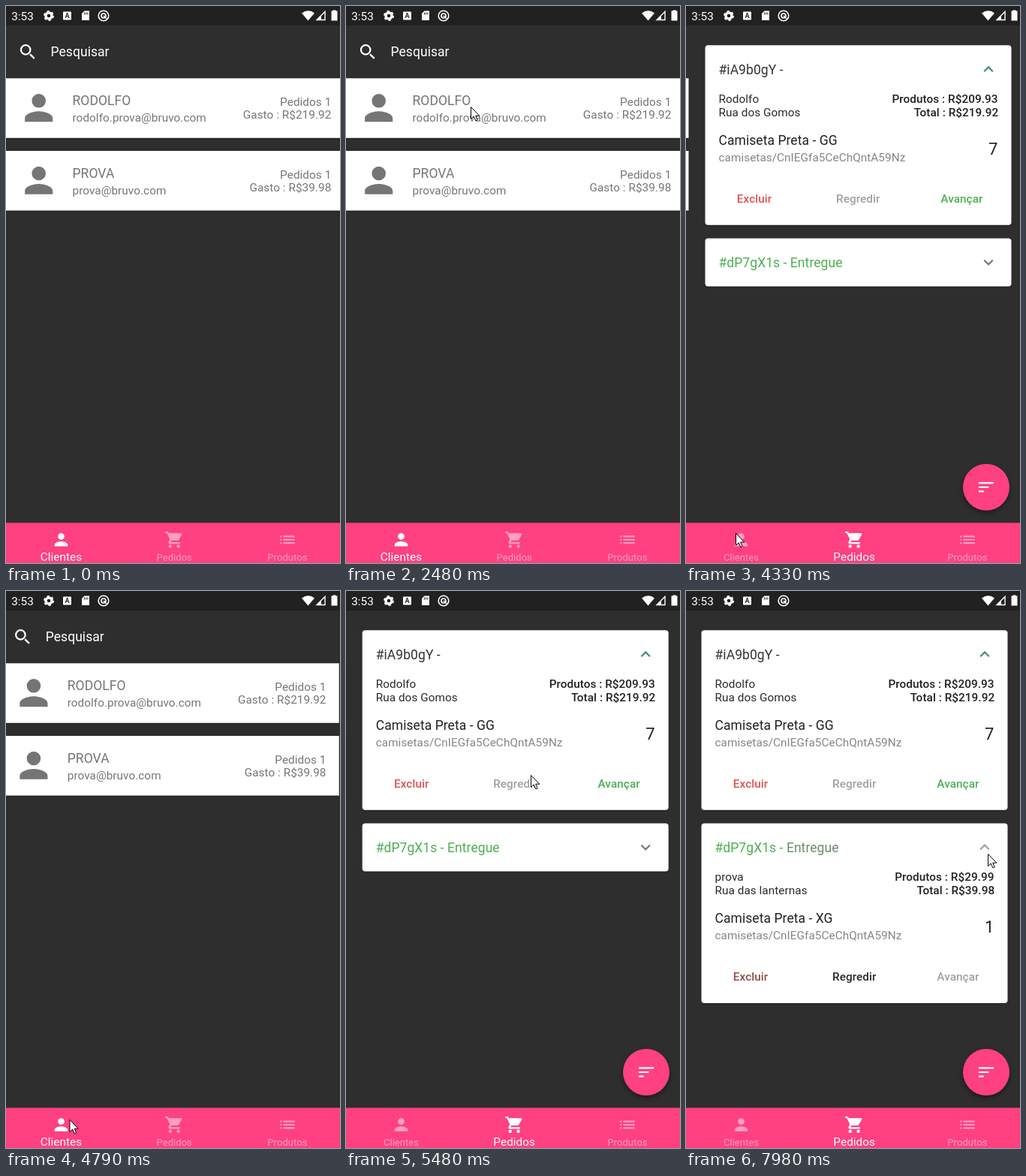
Recreate the animation shown at these times as an HTML page. Size 445 by 742 pixels, loop 8 s.

```html
<!DOCTYPE html>
<html lang="pt">
<head>
<meta charset="utf-8">
<style>
html, body { margin: 0; width: 100%; height: 100%; overflow: hidden; background: #2e2e2e }
svg { display: block; width: 445px; height: 742px; font-family: Roboto, sans-serif }
text { letter-spacing: .06px; white-space: pre }
.card { fill: #fff; filter: drop-shadow(0 1px 1px #0004) }
</style>
</head>
<body>
<svg id="stage" viewBox="0 0 445 742"></svg>
<script>
const LOOP = 8000, PAGE = 452, PINK = '#ff4081', GREEN = '#4caf50', GREY = '#757575';
const END = 'text-anchor="end"', MID = 'text-anchor="middle"', BOLD = ' font-weight="500"';

// Icons on a 24 x 24 grid
const disc = (x, y, r, turn = 1) =>
  `M${x} ${y - r}a${r} ${r} 0 0 ${turn} 0 ${2 * r}a${r} ${r} 0 0 ${turn} 0 ${-2 * r}`;
const bar = (x, y, w) => `M${x} ${y}h${w}v2h${-w}z`;
const ICON = {
  person: disc(12, 8, 4) + 'M4 20v-2c0-2.7 5.3-4 8-4s8 1.3 8 4v2z',
  cart: disc(7, 20, 2) + disc(17, 20, 2) +
    'M1 2v2h2l3.6 7.6-1.4 2.4q-1.2 3 1.8 3h12v-2H7.4l1-2h7.5q1 0 1.7-1l3.6-6.5q.4-1.5-.9-1.5H5.2l-.9-2z',
  list: [7, 11, 15].map(y => bar(3, y, 2) + bar(7, y, 14)).join(''),
  sort: [18, 12, 6].map((w, i) => bar(3, 6 + 5 * i, w)).join(''),
  search: disc(9.5, 9.5, 6.5) + disc(9.5, 9.5, 4.5, 0) + 'M14 15.5l1.5-1.5 5 5-1.5 1.5z',
  chevron: 'M6 10l1.4-1.4 4.6 4.6 4.6-4.6L18 10l-6 6z'
};
const icon = (name, x, y, scale, fill, id = '') =>
  `<g transform="translate(${x} ${y})"><path id="${id}" fill="${fill}" transform="scale(${scale}) translate(-12 -12)" d="${ICON[name]}"/></g>`;
const text = (x, y, str, size, fill, extra = '') =>
  `<text x="${x}" y="${y}" font-size="${size}" fill="${fill}" ${extra}>${str}</text>`;

const client = (row, name, mail, spent) =>
  `<g transform="translate(0 ${96.3 + row * 96.7})"><rect class="card" x="-1.5" width="452" height="79.5"/>` +
  icon('person', 43.7, 39.3, 2.32, GREY) +
  text(88.5, 35.5, name, 17.5, GREY) + text(88.5, 57.5, mail, 15.3, GREY) +
  ['Pedidos 1', `Gasto : R$${spent}`].map((s, i) => text(433.3, 36.5 + 17.5 * i, s, 15.3, GREY, END)).join('') + '</g>';

const order = (id, title, lines, size, count, colors) =>
  `<g transform="translate(0 ${52.2 + (id - 1) * 257.2})">` +
  `<rect id="card${id}" class="card" x="20.5" width="408" height="239.5" rx="4"/>` +
  `<clipPath id="clip${id}"><rect x="20" width="410" height="239.5"/></clipPath><g clip-path="url(#clip${id})">` +
  text(38.5, 38.5, title, 17.5, '#333') + icon('chevron', 398, 32, 1.09, '#3f8f7c', 'arrow' + id) +
  `<g id="body${id}">` +
  lines.map(([left, right], i) => text(38.5, 77 + 17.5 * i, left, 15.3, '#2a2a2a') +
    text(410.5 + i * .7, 77 + 17.5 * i, right, 15.3, '#212121', END + BOLD)).join('') +
  text(38.5, 133, `Camiseta Preta - ${size}`, 17.5, '#212121') +
  text(38.5, 155, 'camisetas/CnIEGfa5CeChQntA59Nz', 15.3, '#858585') +
  text(410.5, 146, count, 22, '#212121', END) +
  ['Excluir', 'Regredir', 'Avançar'].map((s, i) =>
    text(86 + i * 138.2, 209.5, s, 15.3, colors[i], MID + BOLD)).join('') +
  '</g></g></g>';

const TABS = [['person', 'Clientes'], ['cart', 'Pedidos'], ['list', 'Produtos']];
const tabX = i => 73.5 + i * 150.7;

stage.innerHTML = `
<rect width="445" height="742" fill="#2e2e2e"/>
<g id="clients">${icon('search', 29, 61.2, 1.13, '#fff')}${text(59.5, 67, 'Pesquisar', 17.5, '#fff')}
${client(0, 'RODOLFO', 'rodolfo.prova@bruvo.com', '219.92')}
${client(1, 'PROVA', 'prova@bruvo.com', '39.98')}</g>
<g id="orders">
${order(1, '#iA9b0gY -', [['Rodolfo', 'Produtos : R$209.93'], ['Rua dos Gomos', 'Total : R$219.92']], 'GG', 7, ['#e05252', '#a0a0a0', GREEN])}
${order(2, `<tspan fill="${GREEN}">#dP7gX1s - <tspan id="state">Entregue</tspan></tspan>`, [['prova', 'Produtos : R$29.99'], ['Rua das lanternas', 'Total : R$39.98']], 'XG', 1, ['#8d4f47', '#2a2a2a', '#a0a0a0'])}
</g>
<g id="fab"><circle r="31" fill="${PINK}" style="filter:drop-shadow(0 3px 3px #0006)"/>${icon('sort', 0, 0, 1.12, '#fff')}</g>
<rect width="445" height="26" fill="#212121"/>
${text(7.2, 19, '3:53', 15.3, '#fff')}
<g fill="none" stroke="#fff">
<circle cx="57" cy="13" r="4" stroke-width="3.4"/><circle cx="57" cy="13" r="6" stroke-width="2" stroke-dasharray="3.2 3.08"/>
<circle cx="130" cy="13" r="6.8" stroke-width="1.6"/><circle cx="130" cy="13" r="3" stroke-width="1.7"/><path d="M130 13l4 4" stroke-width="1.6"/>
<path d="M414 18.5H425V7.5Z" stroke-width="1.4"/></g>
<g fill="#fff"><rect x="76" y="7.5" width="11" height="11" rx="1"/>
<path d="M104.5 6.5H111V19H101V10Z"/><path d="M394 9.5Q403 3 411 9.5L402.5 19.5Z"/>
<path d="M413.5 19L420 12.5V19Z"/><path d="M435.5 6.5V5.5H439.5V6.5H441.5V19.5H433.5V6.5Z"/></g>
${text(81.5, 16.3, 'A', 9, '#212121', MID + ' font-weight="700"')}
<path d="M104.5 8.5v3m2.2-3v3m2.2-3v3" stroke="#212121"/>
<clipPath id="nav"><rect y="688.6" width="445" height="54"/></clipPath>
<g clip-path="url(#nav)"><rect y="688" width="445" height="54" fill="${PINK}"/>
${TABS.map(([name, label], i) => `<g id="tab${i}">${icon(name, tabX(i), 711, 1.09, '#fff')}${text(tabX(i), 0, label, 13, '#fff', MID)}</g>`).join('')}
<circle id="ripple" cy="719" fill="#ddd"/></g>
<circle id="press" cx="344" cy="354" r="12" fill="#fff066" opacity=".9"/>
<path id="cursor" d="M.5 .5V16.5L4.2 13L6.8 18.8L9.2 17.8L6.7 12.2H11.8Z" fill="#fff" stroke="#000"/>`;

const $ = id => document.getElementById(id);
const set = (id, attrs) => { for (const k in attrs) $(id).setAttribute(k, attrs[k]) };
const clamp = v => Math.max(0, Math.min(1, v));
const mix = (a, b, k) => a + (b - a) * k;
const smooth = k => k * k * (3 - 2 * k);

// cubic-bezier(.25, .1, .25, 1)
function ease(p) {
  let lo = 0, hi = 1;
  for (let i = 0; i < 24; i++) {
    const u = (lo + hi) / 2;
    if (.75 * u * (1 - u) + u ** 3 < p) lo = u; else hi = u;
  }
  return .3 * lo * (1 - lo) ** 2 + 3 * lo * lo * (1 - lo) + lo ** 3;
}

// Pointer stops [arrival, x, y]; each move starts at most 400 ms before arrival
const STOPS = [
  [70, 205, 740], [610, 77, 716], [1000, 194, 714], [1700, 154, 152], [2330, 166, 134],
  [2930, 137, 360], [3330, 148, 635], [3880, 228, 718], [4250, 66, 702], [5100, 206, 717],
  [5480, 246, 245], [5710, 211, 222], [5950, 230, 195], [6350, 360, 251], [7050, 344, 354], [7660, 402, 350]
];
function pointer(t) {
  let [last, x, y] = [0, 205, 746];
  for (const [end, toX, toY] of STOPS) {
    const start = Math.max(last, end - 400), k = smooth(clamp((t - start) / (end - start)));
    x = mix(x, toX, k);
    y = mix(y, toY, k);
    last = end;
  }
  return [x, y];
}

// Page slides [start, tab]; the tapped tab ripples just before
const SLIDES = [[3930, 1], [4400, 0], [5048, 1]], SLIDE_MS = 465;

function draw(t) {
  let slide = 0, ripple = { r: 0 };
  for (const [start, tab] of SLIDES) {
    slide = mix(slide, tab, ease(clamp((t - start) / SLIDE_MS)));
    const age = t - start + 58;
    if (age > 0 && age < 400)
      ripple = { cx: tabX(tab), r: 12 + age * .24, opacity: .35 * clamp((400 - age) / 250) };
  }
  set('ripple', ripple);
  set('clients', { transform: `translate(${-PAGE * slide})` });
  set('orders', { transform: `translate(${PAGE * (1 - slide)})` });
  set('fab', { transform: `translate(400 641) scale(${clamp((slide - .6) / .3)})` });

  const chosen = clamp((slide - .4) / .3);
  [1 - chosen, chosen, 0].forEach((k, i) => {
    set('tab' + i, { opacity: mix(.5, 1, k) });
    const label = $('tab' + i).lastChild;
    label.setAttribute('font-size', mix(13, 15.3, k));
    label.setAttribute('y', mix(739.3, 738.5, k));
  });

  const open = clamp((t - 7400) / 250) ** 1.5, height = mix(64, 239.5, open);
  const turn = angle => `rotate(${angle}) scale(1.09) translate(-12 -12)`;
  set('card2', { height });
  $('clip2').firstChild.setAttribute('height', height);
  set('body2', { visibility: open ? 'visible' : 'hidden' });
  set('arrow1', { transform: turn(180) });
  set('arrow2', { transform: turn(180 * open), fill: open ? '#8fa3a3' : GREY });
  set('state', { fill: open ? '#6c8a6d' : GREEN });

  set('press', { visibility: t >= 7200 && t < 7430 ? 'visible' : 'hidden' });
  set('cursor', { transform: `translate(${pointer(t)})` });
}

const begin = performance.now();
(function frame() {
  draw((performance.now() - begin) % LOOP);
  requestAnimationFrame(frame);
})();
</script>
</body>
</html>
```
